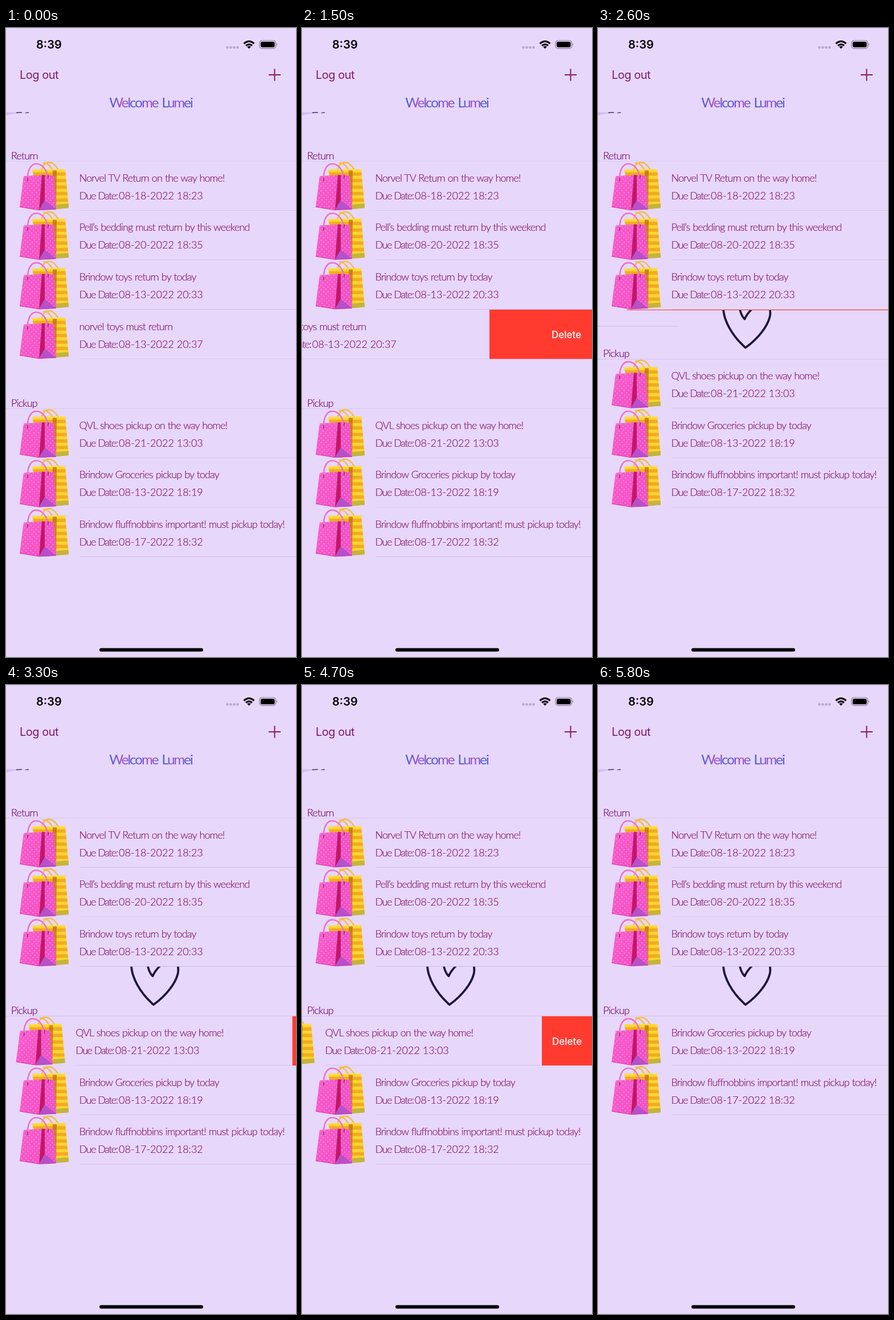
These frames come from a looping animation (509 px wide and 1101 px high, 5.9 s). An HTML page:

```html
<!DOCTYPE html>
<html lang="en">
<head>
<meta charset="utf-8">
<title>Return and pickup list</title>
<style>
html, body { margin: 0; width: 100%; height: 100%; overflow: hidden; background: #e7d7fb; }
svg { display: block; }
.hand { font: 300 18px Lato, sans-serif; letter-spacing: -.9px; word-spacing: 1px; fill: #85156c; stroke: #85156c; stroke-width: .2px; }
.due { letter-spacing: -1.5px; }
.date { letter-spacing: 0; word-spacing: 0; }
.head { fill: #75086c; stroke: #75086c; }
.welcome { font: 400 24px Lato, sans-serif; letter-spacing: -2px; word-spacing: 3px; fill: url(#ink); }
.ui { font-family: Inter, sans-serif; }
.sep { stroke: #cdbddf; stroke-width: 1; }
</style>
</head>
<body>
<svg id="stage" width="509" height="1101" viewBox="0 0 509 1101">
  <defs>
    <linearGradient id="ink" gradientUnits="userSpaceOnUse" x1="188" y1="118" x2="207" y2="128" spreadMethod="reflect">
      <stop offset="0" stop-color="#4560d8"/>
      <stop offset=".5" stop-color="#6d54d2"/>
      <stop offset="1" stop-color="#a452c8"/>
    </linearGradient>
    <linearGradient id="pink" x2="1" y2="1">
      <stop offset="0" stop-color="#f65fcd"/>
      <stop offset="1" stop-color="#f64ec4"/>
    </linearGradient>
    <pattern id="dots" width="8" height="8" patternUnits="userSpaceOnUse" patternTransform="rotate(-4)">
      <circle cx="2" cy="2" r="1.1" fill="#ff92e2"/>
      <circle cx="6" cy="6" r="1.1" fill="#ff92e2"/>
    </pattern>
    <pattern id="stripes" width="20" height="11.4" y="14" patternUnits="userSpaceOnUse">
      <rect width="20" height="11.4" fill="#fbd530"/>
      <rect y="5.5" width="20" height="5.9" fill="#f1ab22"/>
    </pattern>
    <g id="bag">
      <g fill="none" stroke="#f3bd45" stroke-width="2.4" stroke-linecap="round">
        <path d="M63 14C65 6 70 2 76 2S90 8 96 25"/>
        <path d="M66 3C73 3 80 10 84 20"/>
      </g>
      <path d="M46 14.500L104 14L110 81L60 84Z" fill="url(#stripes)"/>
      <path d="M82 15H89L88 83H82Z" fill="#b86a15" opacity=".7"/>
      <path d="M86 76L109.500 74L110 82L87 84Z" fill="#c4b43a"/>
      <path d="M46 14.500L104 14V16H46Z" fill="#ffe03a"/>
      <path d="M31 26L64 24L58 85.500L24 80Z" fill="url(#pink)"/>
      <path d="M31 26L64 24L58 85.500L24 80Z" fill="url(#dots)"/>
      <path d="M66 24L84 25L88 84L58 85.500Z" fill="#f052c6"/>
      <path d="M67 24L84 25L88 84L69 68Z" fill="url(#dots)"/>
      <path d="M63 24L68 24L68 69L58 85.500Z" fill="#c21768"/>
      <path d="M68 68L88 84L58 85.500Z" fill="#b650cb"/>
      <path d="M24 80L58 85.500L88 84" fill="none" stroke="#d035a7"/>
      <path d="M38 34C37 15 44 4.500 53 4.500S70 12 74 28" fill="none" stroke="#ea74c4" stroke-width="2.600" stroke-linecap="round"/>
      <path d="M38 29V35M74 24V30" stroke="#a51e75" stroke-width="1.600"/>
    </g>
  </defs>

  <rect width="509" height="1101" fill="#e7d7fb"/>
  <path d="M0 147.500H42Q20 148.500 0 153Z" fill="#d0bff2"/>
  <path d="M18 148.200L28 147.800M34 148.600L40 148" stroke="#4b405f" stroke-width="1.400"/>
  <g fill="none" stroke="#1e1738" stroke-width="3.800" stroke-linecap="round" stroke-linejoin="round">
    <path d="M220 487C219 511 236 540 259 559.500C281 544 299 521 302 503Q303 496 301 489"/>
    <path d="M248 488Q251 504 257.500 509.500Q261 501 270 492"/>
  </g>
  <g id="list"></g>

  <text class="ui" x="53" y="36" font-size="20" font-weight="600">8:39</text>
  <g fill="#b6a8c7">
    <circle cx="388.500" cy="34" r="2.200"/><circle cx="394.500" cy="34" r="2.200"/>
    <circle cx="400.500" cy="34" r="2.200"/><circle cx="406.500" cy="34" r="2.200"/>
  </g>
  <g fill="none" stroke="#000" stroke-width="3">
    <path d="M417.500 27.300Q426.500 19.200 435.500 27.300"/>
    <path d="M421 31Q426.500 26.200 432 31"/>
  </g>
  <path d="M423.200 33Q426.500 30.500 429.800 33L426.500 36.300Z"/>
  <rect x="445" y="22" width="28.500" height="13.800" rx="4.200" fill="none" stroke="#83778f" stroke-width="1.200"/>
  <rect x="447" y="24" width="24.500" height="9.800" rx="2.600"/>
  <path d="M475 26.500Q477.300 28.800 475 31.300Z" fill="#83778f"/>
  <text class="ui" x="24" y="89" font-size="20" letter-spacing="-.5" fill="#7f1a6d">Log out</text>
  <path d="M461 82H482M471.500 71.500V92.500" stroke="#8b1766" stroke-width="2"/>
  <text class="welcome" x="254" y="138.500" text-anchor="middle">Welcome Lumei</text>
  <rect x="164" y="1085.500" width="182" height="6" rx="3"/>
</svg>
<script>
const LOOP = 5900, STEP = 100, W = 509, ROW = 86.6, OPEN = 89;
const RETURN_TOP = 233.2, PICKUP_TOP = 666.2;
const list = document.getElementById("list");

const returns = [
  ["Norvel TV Return on the way home!", "08-18-2022 18:23"],
  ["Pell’s bedding must return by this weekend", "08-20-2022 18:35"],
  ["Brindow toys return by today", "08-13-2022 20:33"],
  ["norvel toys must return", "08-13-2022 20:37"]
];
const pickups = [
  ["QVL shoes pickup on the way home!", "08-21-2022 13:03"],
  ["Brindow Groceries pickup by today", "08-13-2022 18:19"],
  ["Brindow fluffnobbins important! must pickup today!", "08-17-2022 18:32"]
];

function add(tag, attrs, html = "") {
  const el = document.createElementNS("http://www.w3.org/2000/svg", tag);
  set(el, attrs);
  el.innerHTML = html;
  return list.appendChild(el);
}

function set(el, attrs) {
  for (const key in attrs) el.setAttribute(key, attrs[key]);
}

function header(label) {
  return add("g", {}, `<text class="hand head" x="9" y="-3.500">${label}</text>
    <path class="sep" d="M0 0H${W}"/>`);
}

function makeRow([title, date]) {
  const el = add("svg", { width: W, overflow: "hidden" }, `
    <rect width="${W}" height="${ROW}" fill="#e7d7fb"/>
    <g class="body"><use href="#bag"/>
      <text class="hand" x="128.500" y="35.500">${title}</text>
      <text class="hand due" x="128.500" y="66.500">Due Date:</text>
      <text class="hand date" x="198" y="66.500">${date}</text>
      <path class="sep" d="M129 ${ROW - .4}H${W}"/></g>
    <rect class="red" height="${ROW}" fill="#ff3b30"/>
    <text class="ui label" y="50" font-size="17" font-weight="500" fill="#fff">Delete</text>`);
  const find = name => el.querySelector(name);
  return { el, body: find(".body"), red: find(".red"), label: find(".label") };
}

function placeRow(row, top, height = ROW, off = 0) {
  set(row.el, { y: top, height, display: height > 0 ? "inline" : "none" });
  set(row.body, { transform: `translate(${-off} 0)` });
  set(row.red, { x: W - off, width: off });
  set(row.label, { x: Math.max(438, W + 18 - off) });
}

const returnHead = header("Return");
const returnRows = returns.map(makeRow);
const pickupHead = header("Pickup");
const pickupRows = pickups.map(makeRow);
const trail = add("path", { class: "sep" });

function ease(t, start, length) {
  const u = Math.min(1, Math.max(0, (t - start) / length));
  return u * u * (3 - 2 * u);
}

function track(t, keys) {
  let value = keys[0][1];
  for (let i = 1; i < keys.length; i++) {
    const [t0, v0] = keys[i - 1], [t1, v1] = keys[i];
    value += (v1 - v0) * ease(t, t0, t1 - t0);
  }
  return value;
}

// The row collapses first; its sideways slide and divider finish later.
const removal = (t, start) => ({
  fold: ease(t, start, 400),
  slide: ease(t, start, 510),
  line: ease(t, start, 655)
});

function placeDeleted(row, top, swipe, gone) {
  const height = gone.slide < 1 ? Math.max(1, ROW * (1 - gone.fold)) : 0;
  placeRow(row, top, height, swipe + (W - OPEN) * gone.slide);
  if (gone.line > 0 && gone.line < 1) {
    const off = OPEN + (W - OPEN) * gone.line;
    const y = top + ROW * (1 - gone.line);
    set(trail, { d: `M${129 - off} ${y}H${W - off}` });
  }
}

function draw(t) {
  const first = removal(t, 2200), second = removal(t, 4950);
  const swipe1 = track(t, [[1000, 0], [1500, 180], [1600, 184], [2050, OPEN]]);
  const swipe2 = track(t, [[3200, 0], [3900, 115], [4100, 121], [4650, 88]]);
  const top = PICKUP_TOP - ROW * first.fold;

  set(trail, { d: "" });
  set(returnHead, { transform: `translate(0 ${RETURN_TOP})` });
  set(pickupHead, { transform: `translate(0 ${top})` });
  returnRows.slice(0, 3).forEach((row, i) => placeRow(row, RETURN_TOP + ROW * i));
  pickupRows.slice(1).forEach((row, i) => placeRow(row, top + ROW * (i + 1 - second.fold)));
  placeDeleted(returnRows[3], RETURN_TOP + ROW * 3, swipe1, first);
  placeDeleted(pickupRows[0], top, swipe2, second);
}

const began = performance.now();
function tick() {
  const t = (performance.now() - began) % LOOP;
  draw(Math.floor(t / STEP) * STEP);
  requestAnimationFrame(tick);
}
tick();
</script>
</body>
</html>
```
